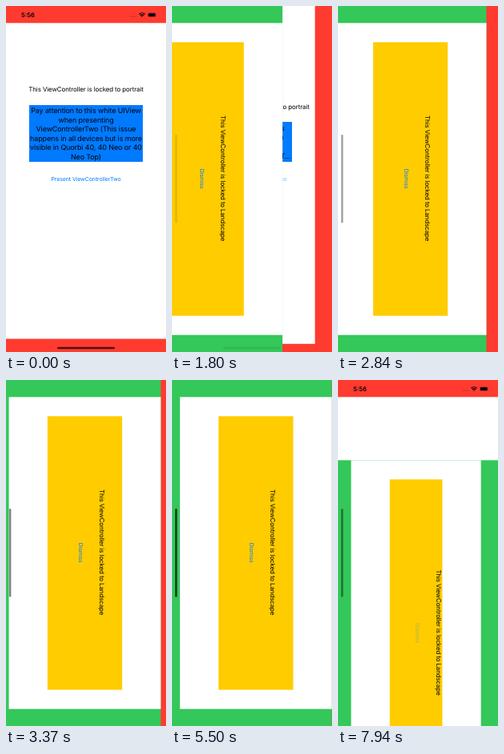
Animation, 200 px wide and 433 px high, one loop 7.99 s. Source, as an HTML page:

```html
<!DOCTYPE html>
<html lang="en">
<head>
<meta charset="utf-8">
<title>Portrait and landscape presentation</title>
<style>
  html, body { margin: 0; width: 100%; height: 100%; overflow: hidden; background: #ff3b30; }
  svg { display: block; width: 100%; height: 100%; }
  text { font-family: Inter, Roboto, sans-serif; text-anchor: middle; text-rendering: geometricPrecision; }
  .label { font-size: 7.95px; letter-spacing: -.11px; }
  .note { font-size: 8.95px; letter-spacing: -.1px; }
  .button { font-size: 7px; letter-spacing: -.09px; fill: #007aff; }
  .clock { font-size: 7.7px; font-weight: 600; }
</style>
</head>
<body>
<svg viewBox="0 0 200 433">
  <rect width="200" height="433" fill="#ff3b30"/>
  <rect id="safe" fill="#fff"/>
  <text id="title" class="label" x="100">This ViewController is locked to portrait</text>
  <rect id="box" fill="#007aff"/>
  <g id="tall" class="note"></g>
  <g id="short" class="note"></g>
  <text id="present" class="button" x="100" y="219.2">Present ViewControllerTwo</text>

  <g id="panel">
    <rect width="200" height="433" fill="#34c759"/>
    <rect id="panelSafe" fill="#fff"/>
    <rect id="card" fill="#ffcc00"/>
    <text class="label" transform="translate(123.2 215.7) rotate(90)">This ViewController is locked to Landscape</text>
    <text id="dismiss" class="button" transform="translate(97.2 216.2) rotate(90)">Dismiss</text>
  </g>

  <g id="status">
    <text class="clock" x="27.5" y="13.8">5:56</text>
    <g opacity=".45">
      <circle cx="155.5" cy="13" r=".6"/><circle cx="157.8" cy="13" r=".6"/>
      <circle cx="160.1" cy="13" r=".6"/><circle cx="162.4" cy="13" r=".6"/>
    </g>
    <g fill="none" stroke="#000" stroke-width="1.2">
      <path d="M166.4 10.2a5.2 5.2 0 0 1 7.2 0"/>
      <path d="M167.8 11.8a3.1 3.1 0 0 1 4.4 0"/>
    </g>
    <path d="M168.9 12.7a1.7 1.7 0 0 1 2.2 0L170 13.9z"/>
    <rect x="177.4" y="8.7" width="9.8" height="4.8" rx="1.4" fill="none" stroke="#000" stroke-width=".5" opacity=".5"/>
    <rect x="178" y="9.3" width="8.6" height="3.6" rx=".9"/>
    <path d="M187.7 10.3q.9.8 0 1.6z" opacity=".6"/>
  </g>
  <rect id="homeBottom" x="64" y="426.7" width="72" height="2.5" rx="1.25"/>
  <rect id="homeLeft" x="3.9" y="161" width="2.5" height="110.5" rx="1.25"/>
</svg>
<script>
const LOOP = 7990;
const TAP = 360, TURN = 450, SLIDE_IN = 485;
const TAP_BACK = 7330, TURN_BACK = 7460, SLIDE_OUT = 7440;
const HOME = 0.7;

const $ = id => document.getElementById(id);
const clamp = v => Math.min(1, Math.max(0, v));
const show = (id, on) => $(id).setAttribute('visibility', on ? 'visible' : 'hidden');
const fade = (id, a) => $(id).setAttribute('opacity', a.toFixed(3));

function place(id, left, top, right, bottom) {
  const r = $(id);
  r.setAttribute('x', left);
  r.setAttribute('y', top);
  r.setAttribute('width', right - left);
  r.setAttribute('height', bottom - top);
}

function fillLines(id, middle, lines) {
  lines.forEach((line, i) => {
    const el = document.createElementNS('http://www.w3.org/2000/svg', 'text');
    el.setAttribute('x', 100);
    el.setAttribute('y', middle + (i - (lines.length - 1) / 2) * 11.55 + 3.2);
    el.textContent = line;
    $(id).append(el);
  });
}

fillLines('tall', 159.8, [
  'Pay attention to this white UIView', 'when presenting',
  'ViewControllerTwo (This issue', 'happens in all devices but is more',
  'visible in Quorbi 40, 40 Neo or 40', 'Neo Top)'
]);
fillLines('short', 170, [
  'Pay attention to this', 'white UIView when', 'presenting', 'ViewControllerTwo (T…'
]);

// Remaining distance of a critically damped spring, from 1 to 0.
function spring(ms) {
  const u = 0.00182 * Math.max(0, ms);
  return (1 + u) * Math.exp(-u);
}

// A pressed button dims at once and recovers slowly after release.
function press(t, down, up) {
  return t < down ? 1 : 0.2 + 0.8 * clamp((t - up) / 3500);
}

function layout(portrait) {
  if (portrait) {
    place('safe', 0, 21.3, 200, 416.5);
    place('box', 29, 124, 171, 195);
    place('panelSafe', 16.4, 0, 178.7, 433);
    place('card', 64.7, 24, 130.4, 409);
  } else {
    place('safe', 21.3, 0, 178.7, 422.8);
    place('box', 50, 145, 150, 195);
    place('panelSafe', 10.1, 21.3, 200, 411.7);
    place('card', 58.4, 45.3, 151.7, 387.7);
  }
  $('title').setAttribute('y', portrait ? 106.9 : 128.5);
  show('tall', portrait);
  show('short', !portrait);
  show('status', portrait);
}

function render(t) {
  layout(t < TURN || t >= TURN_BACK);

  const x = t < 5520 ? -200 * spring(t - SLIDE_IN) : 0;
  const y = t < TURN_BACK ? 0 : 433 * (1 - spring(t - SLIDE_OUT));
  $('panel').setAttribute('transform', `translate(${x.toFixed(3)} ${y.toFixed(3)})`);
  show('panel', t >= SLIDE_IN);

  fade('present', press(t, TAP, SLIDE_IN));
  fade('dismiss', press(t, TAP_BACK, SLIDE_OUT));
  fade('homeBottom', HOME * (1 - clamp((t - SLIDE_IN) / 1500)));
  fade('homeLeft', HOME * clamp((t - 1350) / 2900) * (1 - clamp((t - SLIDE_OUT) / 1300)));
}

const start = performance.now();
function tick() {
  render((performance.now() - start) % LOOP);
  requestAnimationFrame(tick);
}
tick();
</script>
</body>
</html>
```
